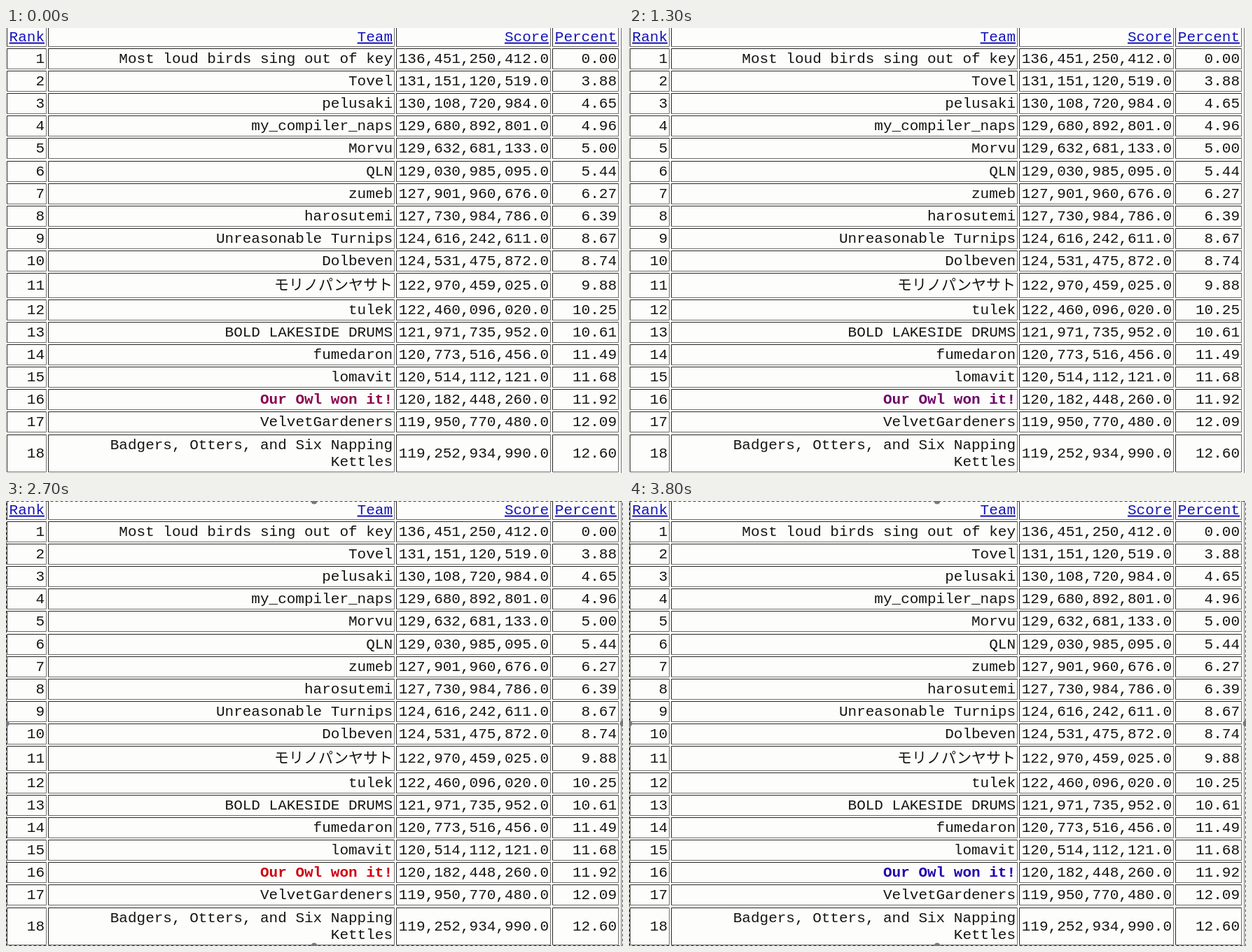
Recreate the animation shown at these times as an HTML page. Size 881 by 636 pixels, loop 3900 ms.

```html
<!DOCTYPE html>
<html lang="en">
<head>
<meta charset="utf-8">
<style>
  html, body { margin: 0; width: 100%; height: 100%; overflow: hidden; background: #fdfdfc; }
  svg { display: block; }
  text { font: 21px "Liberation Mono", "Noto Sans CJK JP", monospace; text-anchor: end; fill: #141414; }
  .link { fill: #1414b8; text-decoration: underline; }
  #winner { font-weight: bold; }
  path { fill: none; }
  .dark { stroke: #262626; }
  .light { stroke: #6c6c6c; }
  #selection rect { fill: none; stroke: #444; stroke-dasharray: 4 3; }
  #selection circle { fill: #77777c; }
</style>
</head>
<body>
<svg id="stage" width="881" height="636" viewBox="0 0 881 636"></svg>
<script>
const LOOP = 3900, STEP = 100, SELECTION_START = 2700;

// Left edge, right edge and text edge of each column
const columns = [[1, 57, 55], [60, 554, 552], [557, 777, 775], [780, 874, 872]];

const rows = `Most loud birds sing out of key|136,451,250,412.0|0.00
Tovel|131,151,120,519.0|3.88
pelusaki|130,108,720,984.0|4.65
my_compiler_naps|129,680,892,801.0|4.96
Morvu|129,632,681,133.0|5.00
QLN|129,030,985,095.0|5.44
zumeb|127,901,960,676.0|6.27
harosutemi|127,730,984,786.0|6.39
Unreasonable Turnips|124,616,242,611.0|8.67
Dolbeven|124,531,475,872.0|8.74
モリノパンヤサト|122,970,459,025.0|9.88
tulek|122,460,096,020.0|10.25
BOLD LAKESIDE DRUMS|121,971,735,952.0|10.61
fumedaron|120,773,516,456.0|11.49
lomavit|120,514,112,121.0|11.68
Our Owl won it!|120,182,448,260.0|11.92
VelvetGardeners|119,950,770,480.0|12.09
Badgers, Otters, and Six Napping/Kettles|119,252,934,990.0|12.60`
  .split("\n").map((line, i) => [i + 1, ...line.split("|")]);

const label = (text, x, y, attrs = "") => `<text x="${x}" y="${y + 6.5}" ${attrs}>${text}</text>`;

function cell(text, [left, right, edge], top, height, attrs) {
  const l = left + .5, r = right + .5, t = Math.round(top) + .5, b = Math.round(top + height) - .5;
  const lines = String(text).split("/");
  const middle = top + height / 2 - .5;
  return `<path class="light" d="M${l} ${b}H${r}V${t}"/><path class="dark" d="M${l} ${b}V${t}H${r}"/>` +
    lines.map((s, i) => label(s, edge, middle + (i - (lines.length - 1) / 2) * 24, attrs)).join("");
}

function table() {
  let svg = ["Rank", "Team", "Score", "Percent"]
    .map((name, i) => cell(name, columns[i], -2, 29, 'class="link"')).join("");
  let top = 29;
  for (const row of rows) {
    const height = row[0] === 11 ? 35.5 : row[0] === 18 ? 54.5 : 30;
    svg += row.map((text, i) =>
      cell(text, columns[i], top, height, row[0] === 16 && i === 1 ? 'id="winner"' : "")).join("");
    top += height + 2.12;
  }
  return svg + '<path class="light" d="M878.5 0V636"/>';
}

function selection() {
  const handles = [[440, 0], [440, 636], [0, 318], [881, 318]];
  return `<g id="selection"><rect x=".5" y=".5" width="880" height="635"/>` +
    handles.map(([x, y]) => `<circle cx="${x}" cy="${y}" r="4.5"/>`).join("") + "</g>";
}

document.getElementById("stage").innerHTML = table() + selection();
const winner = document.getElementById("winner");
const marquee = document.getElementById("selection");

// Time and share of blue in the red-to-blue pulse
const pulse = [[0, .37], [500, 0], [1000, 0], [1600, 1], [1800, .8], [2400, .16],
               [2650, 0], [3100, .63], [3500, 1], [3800, .85], [3900, .7]];

function blueAt(time) {
  const i = pulse.findIndex(([t]) => t > time);
  const [t0, a] = pulse[i - 1], [t1, b] = pulse[i];
  return a + (b - a) * (time - t0) / (t1 - t0);
}

function draw() {
  const time = Math.floor(performance.now() % LOOP / STEP) * STEP;
  const blue = blueAt(time);
  winner.style.fill = `rgb(${221 * (1 - blue)}, 0, ${204 * blue})`;
  marquee.style.display = time >= SELECTION_START ? "" : "none";
  requestAnimationFrame(draw);
}
draw();
</script>
</body>
</html>
```
